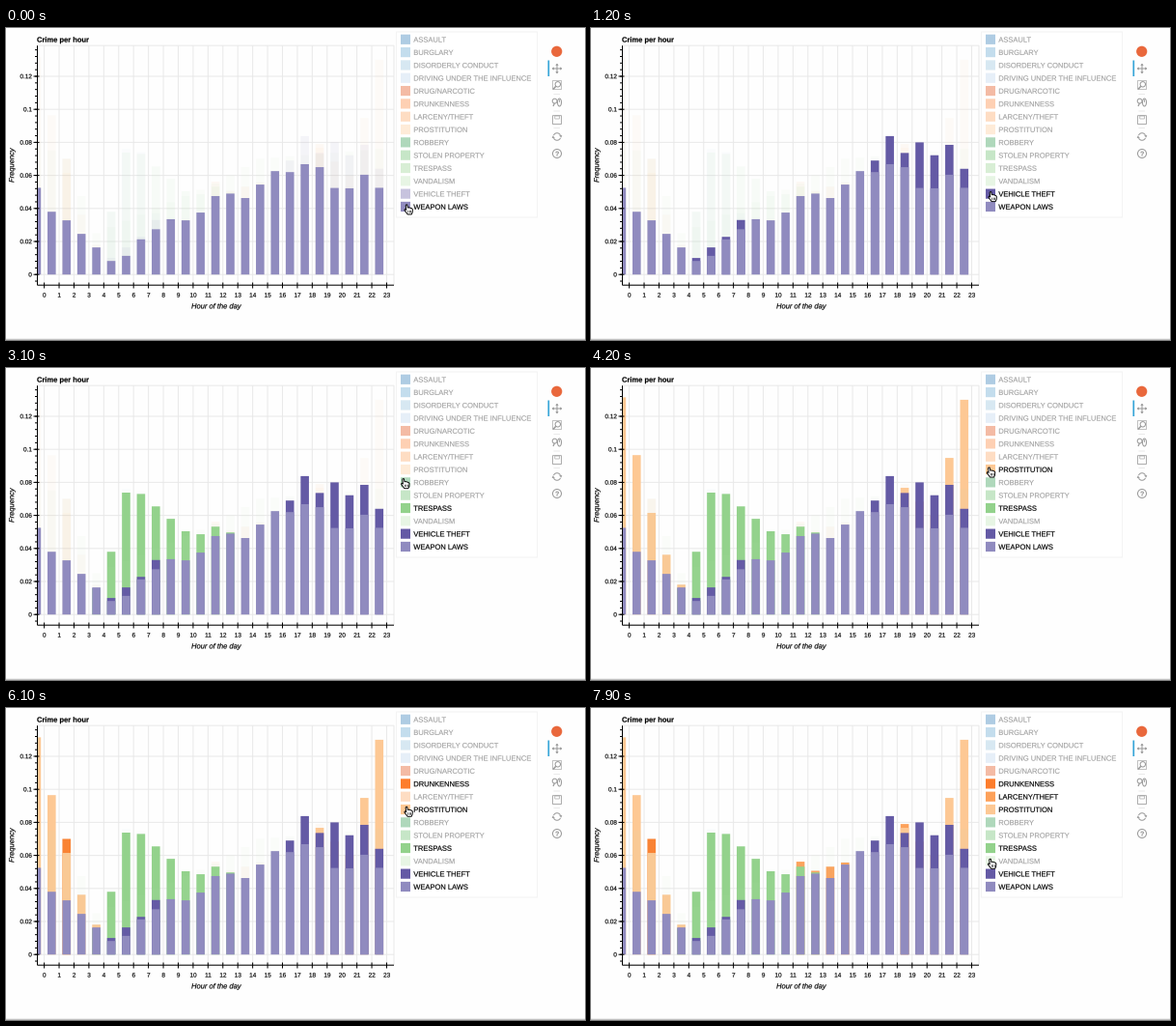
Write a matplotlib script that moves like this. It is 600x323 px and loops after 8000 ms.

```python
import numpy as np
import matplotlib.pyplot as plt
from matplotlib.animation import FuncAnimation
from matplotlib.patches import Arc, Circle, PathPatch, Polygon, Rectangle
from matplotlib.path import Path
from matplotlib.textpath import TextPath

W, H, FRAMES, STEP = 600, 323, 80, 100
LEFT, RIGHT, TOP, BOTTOM = 32.5, 402, 18.2, 266.2
ZERO, UNIT = 255.2, 1.71          # y of zero, pixels per 0.001
X0, DX, BAR_W = 39.6, 15.43, 8.6  # first hour tick, spacing, bar width
PX = 0.72                         # points per pixel at 100 dpi
GRID, ICON = "#e9e9e9", "#999999"

plt.rcParams["path.snap"] = False
fig = plt.figure(figsize=(W / 100, H / 100), dpi=100, facecolor="#fefefe")
ax = fig.add_axes([0, 0, 1, 1])
ax.set(xlim=(0, W), ylim=(H, 0))
ax.axis("off")


def line(xs, ys, color="black", width=1.0, z=1, **kw):
    return ax.plot(xs, ys, color=color, lw=width * PX, zorder=z,
                   solid_capstyle="butt", **kw)[0]


def box(x, y, w, h, z=1, fill="none", edge="none", width=1.0):
    return ax.add_patch(Rectangle((x, y), w, h, fc=fill, ec=edge,
                                  lw=width * PX, zorder=z))


def ring(x, y, r, width=1.0, fill="none"):
    ax.add_patch(Circle((x, y), r, fc=fill, ec=ICON, lw=width * PX, zorder=2))


def arc(x, y, w, h, start=0, end=360):
    ax.add_patch(Arc((x, y), w, h, theta1=start, theta2=end, ec=ICON, lw=PX))


def label(x, y, s, size=7.53, align=0, color="black", z=1, upright=False, **font):
    """Outline text on a baseline; align 0, 0.5, 1 is left, centre, right."""
    path = TextPath((0, 0), s, size=size, prop={"family": "Liberation Sans", **font})
    pts = path.vertices * (1, -1)
    pts[:, 0] -= align * path.get_extents().x1
    if upright:
        pts = pts[:, ::-1] * (1, -1)
    return ax.add_patch(PathPatch(Path(pts + (x, y), path.codes), fc=color,
                                  ec=color, lw=0.12, zorder=z))


# name, time switched on (ms), key points (hour slot, thousandths)
SERIES = [
    ("ASSAULT", None, []),
    ("BURGLARY", None, []),
    ("DISORDERLY CONDUCT", None, []),
    ("DRIVING UNDER THE INFLUENCE", None, [(4, 0), (6, 76), (7, 74), (9, 0)]),
    ("DRUG/NARCOTIC", None, []),
    ("DRUNKENNESS", 5200, [(1, 0), (2, 70), (3, 0)]),
    ("LARCENY/THEFT", 6900, [(11, 0), (12, 56.2), (13, 50.7), (15, 55.7), (16, 0),
                             (18, 0), (19, 79), (20, 0)]),
    ("PROSTITUTION", 3900, [(0, 131.5), (2, 61.5), (3, 36.2), (5, 0), (18, 0),
                            (19, 76.7), (21, 60), (22, 94.8), (23, 130)]),
    ("ROBBERY", None, []),
    ("STOLEN PROPERTY", None, []),
    ("TRESPASS", 2600, [(3, 0), (4, 15.9), (5, 38), (6, 73.8), (7, 73), (10, 50.4),
                        (11, 48.6), (12, 53.2), (13, 49.7), (14, 0)]),
    ("VANDALISM", None, [(0, 80), (2, 70), (4, 25), (12, 55), (15, 70), (23, 76)]),
    ("VEHICLE THEFT", 1000, [(4, 0), (5, 10), (7, 22.8), (8, 33), (9, 0), (16, 0),
                             (17, 69), (18, 83.8), (19, 73.6), (20, 80),
                             (21, 72.2), (22, 78.5), (23, 64)]),
    ("WEAPON LAWS", 0, [(0, 52.5), (1, 38), (2, 32.8), (5, 8.2), (6, 11.3), (7, 21.3),
                        (9, 33.5), (10, 32.8), (11, 37.5), (12, 47.5), (13, 49),
                        (14, 46.3), (16, 62.6), (17, 62), (18, 66.8), (19, 65),
                        (20, 52.4), (21, 52.2), (22, 60.4), (23, 52.5)]),
]
COLORS = np.array(plt.get_cmap("tab20c").colors) ** 1.2


def row_y(row):
    return 11.8 + 13.32 * row


def draw_axes():
    for hour in range(24):
        x = X0 + DX * hour
        line([x, x], [TOP, BOTTOM], GRID)
        line([x, x], [263.5, 269.5], z=6)
        label(x, 278.6, str(hour), 6.4, align=0.5)
    for k in range(7):
        y = ZERO - 20 * UNIT * k
        line([LEFT, RIGHT], [y, y], GRID)
        line([28.5, 34.5], [y, y], z=6)
        label(26.6, y + 2.2, f"{k * 0.02:g}", 6.4, align=1)
    for y in ZERO - 4 * UNIT * np.arange(-1, 35):
        line([30, LEFT], [y, y], z=6)
    box(LEFT, TOP, RIGHT - LEFT, BOTTOM - TOP, edge=GRID)
    line([LEFT, LEFT], [TOP, BOTTOM], z=6)
    line([LEFT, RIGHT], [BOTTOM, BOTTOM], z=6)
    label(32, 14.6, "Crime per hour", weight="bold")
    label(218, 290.4, "Hour of the day", align=0.5, style="italic")
    label(8.2, 142, "Frequency", align=0.5, upright=True, style="italic")
    line([0, W], [322.3, 322.3], "#b4b4b4")


def draw_bars(color, keys):
    if not keys:
        return []
    bars = []
    for slot, value in enumerate(np.interp(range(24), *zip(*keys))):
        mid = X0 + DX * (slot - 0.5)
        x = max(mid - BAR_W / 2, LEFT)
        bars.append(box(x, ZERO, mid + BAR_W / 2 - x, -value * UNIT, z=3, fill=color))
    return bars


def draw_toolbar():
    x = 571
    ax.add_patch(Circle((570.7, 24.3), 5.6, fc="#e9683c", ec="none"))
    line([562.3, 562.3], [33.5, 50], "#35a5d8", 1.7)
    # pan
    line([x - 5, x + 5], [42, 42], ICON)
    line([x, x], [37, 47], ICON)
    for d in np.array([(1, 0), (-1, 0), (0, 1), (0, -1)]):
        tip, side = (x, 42) + 5.2 * d, 1.7 * d[::-1]
        ax.add_patch(Polygon([tip, tip - 2 * d + side, tip - 2 * d - side],
                             fc=ICON, ec="none"))
    # zoom tools
    box(x - 4.5, 54.5, 9, 9, edge=ICON, width=0.6)
    ring(x + 0.8, 58.3, 2.7, fill="white")
    line([x - 1.2, x - 4], [60.3, 63.4], ICON, 1.5, 2)
    ring(x - 2.4, 75.6, 2.4)
    line([x - 2.6, x - 4], [78, 81], ICON, 1.2)
    arc(x + 2.5, 77, 4, 8)
    line([x + 2.5, x + 2.5], [74, 77], ICON, 0.8)
    # save
    box(x - 4.5, 90.7, 9, 8.8, edge=ICON, width=0.8)
    box(x - 2.2, 91, 4.6, 3, edge=ICON, width=0.6)
    # reset
    for s, start in ((1, 200), (-1, 20)):
        arc(x, 112.5, 7.5, 7.5, start, start + 135)
        ax.add_patch(Polygon([(x + s * 5.3, 112.5 - s * 1.4),
                              (x + s * 2.2, 112.5 - s * 1.4),
                              (x + s * 4.3, 112.5 + s * 1.1)], fc=ICON, ec="none"))
    # help
    ring(x, 130, 4.5)
    label(x, 132.6, "?", 7, align=0.5, color=ICON, weight="bold")
    for y in (68.5, 86, 103.5):
        line([x - 3.5, x + 3], [y, y], "#e4e4e4", 0.8)


draw_axes()
draw_toolbar()
box(404.5, 4, 146, 192, z=7, fill="white", edge="#f3f3f3")
parts = []
for row, ((name, on, keys), color) in enumerate(zip(SERIES, COLORS)):
    swatch = box(409, row_y(row) - 5.1, 10, 10.2, z=8, fill=color)
    text = label(422.3, row_y(row) + 2.8, name, z=8)
    parts.append((on, draw_bars(color, keys), swatch, text))

HAND = np.array([(-2.6, -5), (-1.4, -5), (-0.8, -1.9), (0.6, -2.1), (3.5, -1.1),
                 (4.2, 0), (4, 2.8), (3, 5), (-1, 5), (-4.3, 0.6),
                 (-3.7, -0.5), (-2.4, 0.4), (-3, -4)])
hand = ax.add_patch(Polygon(HAND, fc="white", ec="black", lw=0.95 * PX, zorder=10,
                            joinstyle="round"))
knuckles = [line([], [], width=0.6, z=11) for _ in range(3)]

# arrival time and legend row of each pointer stop
STOPS = [(0, 13), (900, 12), (2500, 10), (3350, 7), (5000, 5), (6000, 7),
         (6700, 6), (7900, 11)]
TRAVEL = 700


def pointer(t):
    row = STOPS[0][1]
    for (_, start), (arrive, end) in zip(STOPS, STOPS[1:]):
        u = np.clip((t - arrive + TRAVEL) / TRAVEL, 0, 1)
        row += (end - start) * u * u * (3 - 2 * u)
    return 415.5 + 1.7 * np.cos(2 * np.pi * t / 6400), row_y(row) + 3


def update(i):
    t = i * STEP
    for on, bars, swatch, text in parts:
        active = on is not None and t >= on
        for bar in bars:
            bar.set_alpha(1 if active else 0.06)
        swatch.set_alpha(1 if active else 0.36)
        text.set_alpha(1 if active else 0.31)
    x, y = pointer(t)
    hand.set_xy(HAND + (x, y))
    for k, mark in enumerate(knuckles):
        mark.set_data([x - 0.4 + 1.5 * k] * 2, [y + 1, y + 3.4])
    return []


anim = FuncAnimation(fig, update, frames=FRAMES, interval=STEP,
                     repeat=True, repeat_delay=0, blit=False)
plt.show()
```
